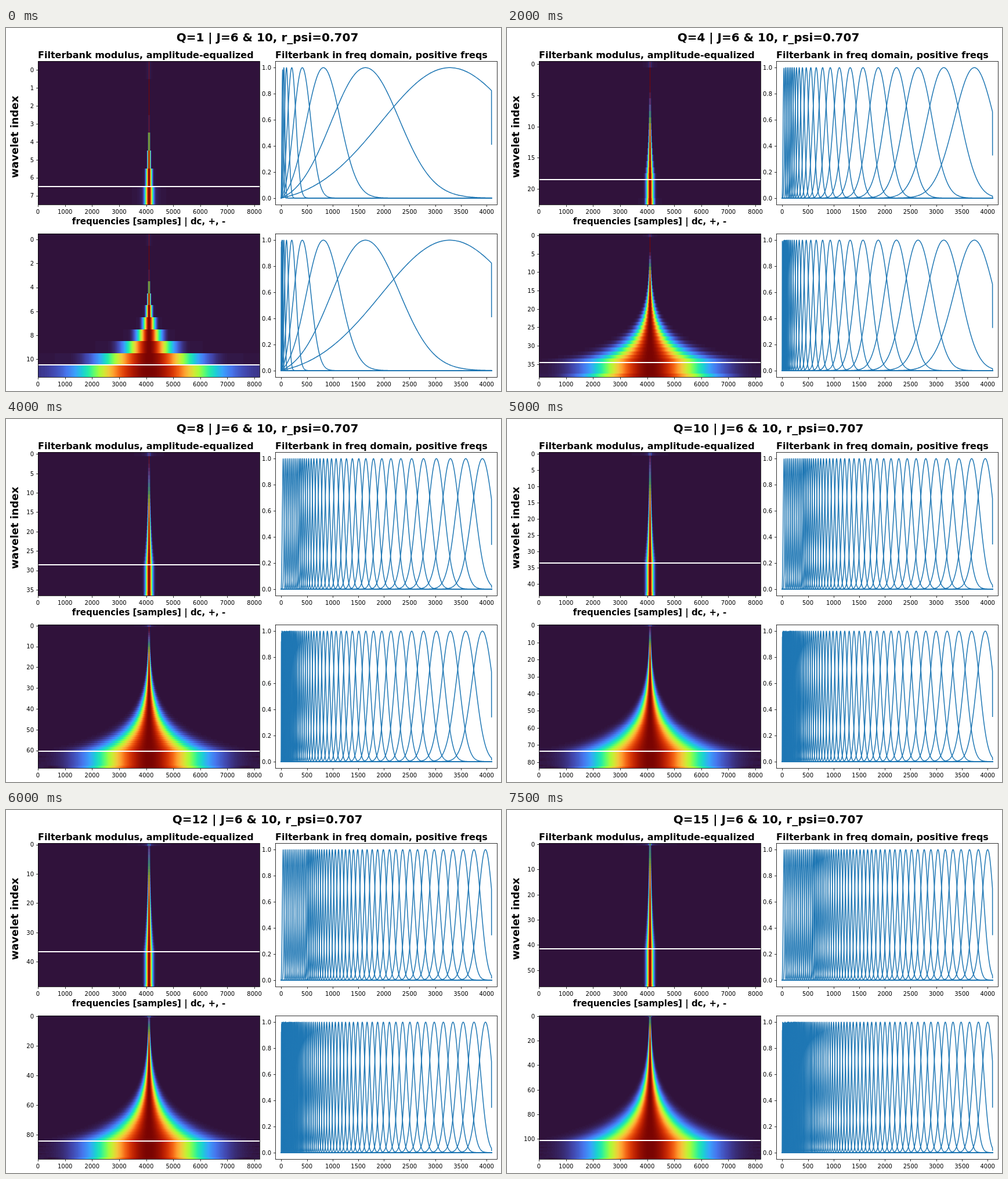
Recreate the animation shown at these times as an HTML page with a canvas. Size 853 by 625 pixels, loop 8 s.

```html
<!DOCTYPE html>
<html lang="en">
<head>
<meta charset="utf-8">
<title>Filterbank</title>
<style>
  html, body { margin: 0; width: 100%; height: 100%; overflow: hidden; background: #fff; }
  canvas, svg { position: absolute; left: 0; top: 0; width: 853px; height: 625px; display: block; }
  text { font: 10px "DejaVu Sans", sans-serif; fill: #000; white-space: pre; }
  text.b { font-weight: bold; }
  .axis { fill: none; stroke: #000; stroke-width: .8; }
</style>
</head>
<body>
<canvas id="plot" width="853" height="625"></canvas>
<svg id="labels" width="853" height="625" viewBox="0 0 853 625"></svg>
<script>
const W = 853, H = 625, LOOP = 8000;
const N = 8192, HALF = N / 2;
const LEFT = 55, RIGHT = 464, PW = 382, PH = 247;
const PANELS = [{ J: 6, top: 57 }, { J: 10, top: 354 }];

const svg = document.getElementById('labels');
const view = document.getElementById('plot').getContext('2d');

// ---- filters ----

// Frequency centres and widths in bins: a geometric part, then Q evenly spaced ones
function filterParams(Q, J) {
  const f = 2 ** (-1 / Q);
  const ratio = (1 - f) / (1 + f) / Math.sqrt(Math.log(2));
  const sMin = 0.13 * N / 2 ** J;
  const list = [];
  let xi = Math.max(0.4, 1 / (1 + 1 / f)) * N;
  for (; xi * ratio > sMin; xi *= f) list.push({ xi, s: xi * ratio });
  const cqt = list.length, last = list[cqt - 1].xi;
  for (let q = Q; q >= 1; q--) list.push({ xi: last * q / (Q + 1), s: sMin });
  return { list, cqt };
}

// L1 norm in time of a Morlet with centre/width ratio a
function morletNorm(a, kappa) {
  const dz = 0.1;
  let sum = 0;
  for (let z = -5; z <= 5; z += dz) {
    sum += Math.exp(-z * z / 2) * Math.sqrt(1 + kappa * kappa - 2 * kappa * Math.cos(a * z));
  }
  return sum * dz / Math.sqrt(2 * Math.PI);
}

// Analytic Morlet spectrum on bins 0..N/2, Nyquist halved
function morlet({ xi, s }) {
  const h = new Float64Array(HALF + 1);
  const gauss = d => Math.exp(-d * d / (2 * s * s));
  const kappa = gauss(xi), norm = morletNorm(xi / s, kappa);
  for (let k = 0; k <= HALF; k++) h[k] = (gauss(k - xi) - kappa * gauss(k)) / norm;
  h[HALF] /= 2;
  return h;
}

const re = new Float64Array(N), im = new Float64Array(N);
const cosT = Float64Array.from({ length: HALF }, (_, k) => Math.cos(2 * Math.PI * k / N));
const sinT = Float64Array.from({ length: HALF }, (_, k) => Math.sin(2 * Math.PI * k / N));
const rev = new Uint16Array(N);
for (let i = 1; i < N; i++) rev[i] = (rev[i >> 1] >> 1) | ((i & 1) * HALF);

// Transforms the spectrum to time; the result stays in re and im
function toTime(h) {
  re.fill(0);
  im.fill(0);
  for (let k = 0; k <= HALF; k++) re[rev[k]] = h[k];
  for (let half = 1; half < N; half *= 2) {
    const stride = HALF / half;
    for (let start = 0; start < N; start += 2 * half) {
      for (let j = 0; j < half; j++) {
        const c = cosT[j * stride], s = sinT[j * stride];
        const a = start + j, b = a + half;
        const x = re[b] * c - im[b] * s, y = re[b] * s + im[b] * c;
        re[b] = re[a] - x; im[b] = im[a] - y;
        re[a] += x; im[a] += y;
      }
    }
  }
}

// Modulus scaled to a peak of 1, centred, one nearest sample per pixel column
function modulusRow(h) {
  toTime(h);
  let max = 0;
  for (let i = 0; i < N; i++) max = Math.max(max, re[i] * re[i] + im[i] * im[i]);
  return Float64Array.from({ length: PW }, (_, i) => {
    const t = (Math.round((i - PW / 2) * N / PW) + N) % N;
    return Math.sqrt((re[t] * re[t] + im[t] * im[t]) / max);
  });
}

// ---- colours ----

const STOPS = ('30123b 4145ab 4675ed 39a2fc 1bcfd4 24eca6 61fc6c a4fc3b ' +
  'd1e834 f3c63a fe9b2d f36315 d93806 b11901 7a0402').split(' ')
  .map(hex => [0, 2, 4].map(i => parseInt(hex.substr(i, 2), 16)));

const PALETTE = Array.from({ length: 256 }, (_, i) => {
  const p = i / 255 * (STOPS.length - 1), j = Math.min(Math.floor(p), STOPS.length - 2);
  return STOPS[j].map((c, n) => c + (STOPS[j + 1][n] - c) * (p - j));
});

// ---- drawing ----

const sampleX = v => LEFT + (v + 0.5) / N * PW;
const freqX = v => 474.3 + v * 362.4 / HALF;
const levelY = (v, top) => top + PH * (1.05 - v) / 1.1;

function drawHeat(ctx, rows, top) {
  const img = ctx.createImageData(PW, PH);
  for (let y = 0, o = 0; y < PH; y++) {
    const row = rows[Math.floor((y + 0.5) * rows.length / PH)];
    for (let x = 0; x < PW; x++, o += 4) {
      const [r, g, b] = PALETTE[Math.min(255, Math.floor(row[x] * 256))];
      img.data[o] = r; img.data[o + 1] = g; img.data[o + 2] = b; img.data[o + 3] = 255;
    }
  }
  ctx.putImageData(img, LEFT, top);
}

function drawCurve(ctx, h, s, top) {
  const step = Math.max(1, Math.floor(s / 40)), tiny = 1e-4;
  const point = k => ctx.lineTo(freqX(k), levelY(h[k], top));
  ctx.beginPath();
  point(0);
  for (let k = step; k < HALF - 1; k += step) {
    if (h[k] > tiny || h[k - step] > tiny || h[k + step] > tiny) point(k);
  }
  point(HALF - 1);
  point(HALF);
  ctx.stroke();
}

const scenes = new Map();

function scene(Q) {
  if (scenes.has(Q)) return scenes.get(Q);
  const canvas = document.createElement('canvas');
  canvas.width = W;
  canvas.height = H;
  const ctx = canvas.getContext('2d');
  ctx.fillStyle = '#fff';
  ctx.fillRect(0, 0, W, H);
  ctx.strokeStyle = '#1f77b4';
  ctx.lineWidth = 1.5;
  ctx.lineJoin = 'round';
  ctx.lineCap = 'square';
  const counts = PANELS.map(({ J, top }) => {
    const { list, cqt } = filterParams(Q, J);
    const rows = list.map(p => {
      const h = morlet(p);
      drawCurve(ctx, h, p.s, top);
      return modulusRow(h);
    });
    drawHeat(ctx, rows, top);
    ctx.fillStyle = '#fff';
    ctx.fillRect(LEFT, Math.round(top + PH * cqt / rows.length) - 1, PW, 2);
    return rows.length;
  });
  const made = { canvas, counts };
  scenes.set(Q, made);
  return made;
}

// ---- axes and text ----

function add(parent, tag, attrs, text) {
  const node = document.createElementNS('http://www.w3.org/2000/svg', tag);
  for (const key in attrs) node.setAttribute(key, attrs[key]);
  if (text !== undefined) node.textContent = text;
  parent.appendChild(node);
  return node;
}

const snap = v => Math.round(v - 0.001) + 0.5;

function bold(x, y, size, text, anchor = 'start', extra = {}) {
  return add(svg, 'text',
    { x, y, class: 'b', style: `font-size:${size}px`, 'text-anchor': anchor, ...extra }, text);
}

function tickX(x, bottom, label) {
  add(svg, 'path', { class: 'axis', d: `M${snap(x)} ${bottom + 0.5}v3.5` });
  add(svg, 'text', { x, y: bottom + 16, 'text-anchor': 'middle' }, label);
}

function tickY(parent, left, y, label) {
  add(parent, 'path', { class: 'axis', d: `M${left + 0.5} ${snap(y)}h-3.5` });
  add(parent, 'text', { x: left - 7, y: Math.round(y + 3.8), 'text-anchor': 'end' }, label);
}

function tickStep(range) {
  const raw = range / 9, p = 10 ** Math.floor(Math.log10(raw));
  return p * [1, 2, 2.5, 5, 10].find(m => m * p >= raw - 1e-9);
}

for (const { top } of PANELS) {
  for (const left of [LEFT, RIGHT]) {
    add(svg, 'rect', { class: 'axis', x: left + 0.5, y: top + 0.5, width: PW, height: PH });
  }
  for (let v = 0; v <= 8000; v += 1000) tickX(sampleX(v), top + PH, v);
  for (let v = 0; v <= 4000; v += 500) tickX(freqX(v), top + PH, v);
  for (let i = 0; i <= 5; i++) tickY(svg, RIGHT, levelY(i / 5, top), (i / 5).toFixed(1));
}
const title = bold(450.5, 23, 20, '', 'middle');
bold(LEFT, 52, 16, 'Filterbank modulus, amplitude-equalized');
bold(RIGHT, 52, 16, 'Filterbank in freq domain, positive freqs');
bold(246, 338, 15, 'frequencies [samples] | dc, +, -', 'middle');
bold(0, 0, 18, 'wavelet index', 'middle', { transform: 'translate(21 187.5) rotate(-90)' });
const rowTicks = add(svg, 'g', {});

// ---- animation ----

const LAST = 15;
let shown = 0;

function show(Q) {
  if (Q === shown) return;
  shown = Q;
  const { canvas, counts } = scene(Q);
  view.drawImage(canvas, 0, 0);
  title.textContent = `Q=${Q} | J=6 & 10, r_psi=0.707`;
  rowTicks.replaceChildren();
  counts.forEach((count, i) => {
    const step = tickStep(count), digits = step % 1 ? 1 : 0;
    for (let v = 0; v <= count - 0.5; v += step) {
      tickY(rowTicks, LEFT, PANELS[i].top + (v + 0.5) / count * PH, v.toFixed(digits));
    }
  });
  // prepare the next picture ahead of its time
  setTimeout(() => scene(Q % LAST + 1), 30);
}

const start = performance.now();

function tick() {
  const t = (performance.now() - start) % LOOP;
  show(Math.max(1, Math.floor(t / 500)));
  requestAnimationFrame(tick);
}
tick();
</script>
</body>
</html>
```
